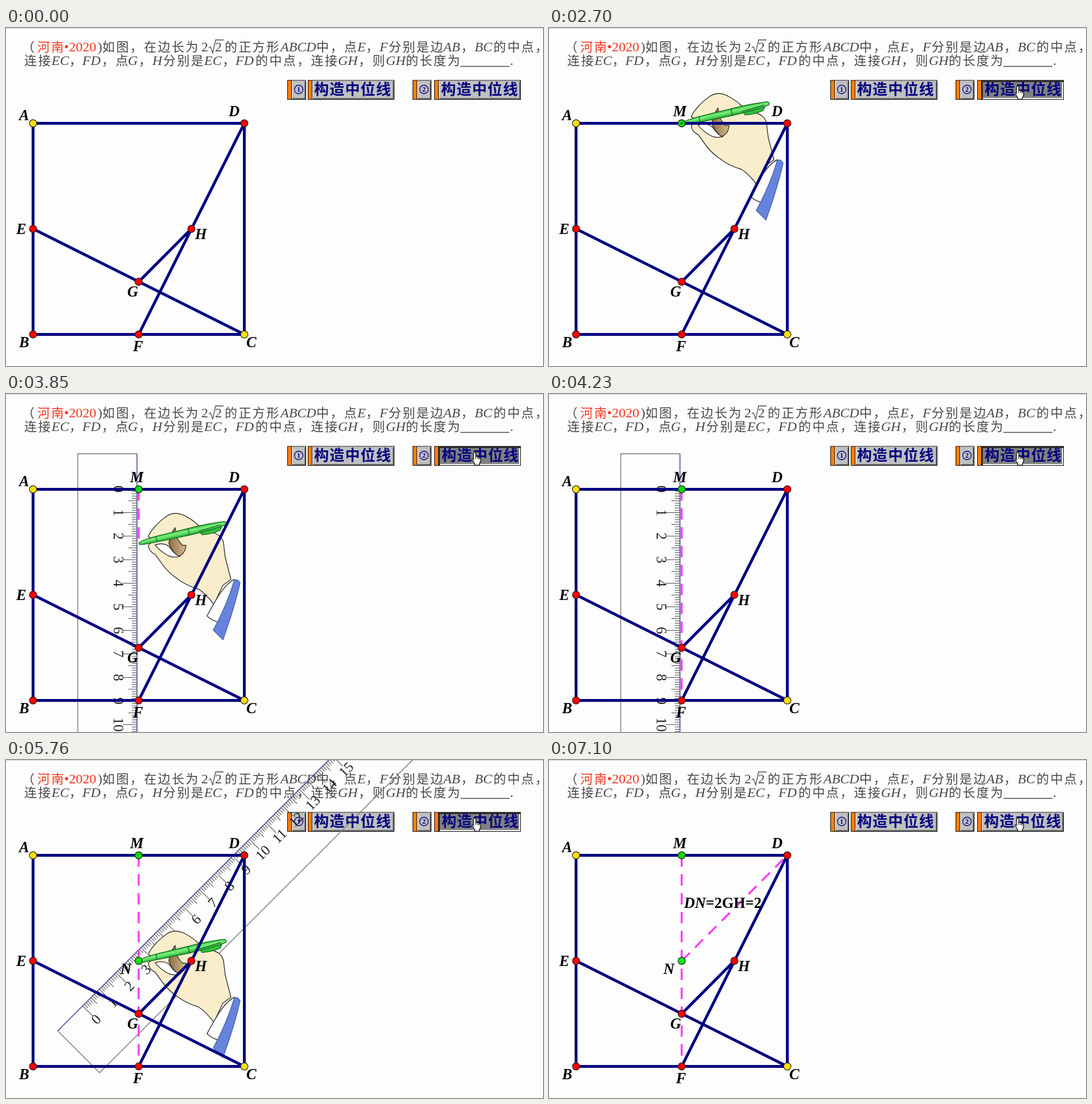
These frames come from a looping animation (943x594 px, 8 s). An HTML page:

```html
<!DOCTYPE html>
<html lang="zh">
<head>
<meta charset="utf-8">
<title>构造中位线</title>
<style>
html, body { margin: 0; width: 100%; height: 100%; overflow: hidden; background: #fdfdfd; }
svg { display: block; width: 100vw; height: 100vh; }
text { white-space: pre; }
.cjk { font: 22px "Noto Sans CJK SC", "Noto Sans CJK", sans-serif; letter-spacing: 2.4px; fill: #484848; }
.num, .var { font: 24px "Liberation Serif", serif; fill: #484848; }
.var { font-style: italic; }
.red { fill: #f5341f; }
.label { font: italic bold 26.5px "Liberation Serif", serif; }
.label .up { font-style: normal; }
.btn { font: bold 26px "Noto Sans CJK SC", "Noto Sans CJK", sans-serif; letter-spacing: 1.2px; fill: #000080; }
.digit { font: bold 12px "Liberation Serif", serif; fill: #000080; text-anchor: middle; }
.scale { font: 25px "Liberation Serif", serif; text-anchor: middle; fill: #222; }
.line { fill: none; stroke: #000080; stroke-width: 5; }
.dash { stroke: #fb3cf4; stroke-width: 3.4; stroke-dasharray: 20 13.2; }
</style>
</head>
<body>
<svg viewBox="0 0 943 594" preserveAspectRatio="none">
  <defs>
    <linearGradient id="pen" x1="0" y1="0" x2="0" y2="1">
      <stop offset="0" stop-color="#2fc23a"/><stop offset=".4" stop-color="#7df07c"/><stop offset="1" stop-color="#18a52a"/>
    </linearGradient>
    <linearGradient id="palm">
      <stop offset="0" stop-color="#8c6b45"/><stop offset="1" stop-color="#d9bd8e"/>
    </linearGradient>
  </defs>
  <path d="M0 .5H943" stroke="#cfcfcf"/>
  <g id="title"></g>
  <g id="buttons"></g>
  <g id="ruler" fill="none"></g>
  <g id="hand" stroke="#333" stroke-width="1.4" stroke-linejoin="round">
    <path fill="#f9edcb" d="M17-11C18-19 36-38 45-44C56-54 69-54 81-48Q96-40 105-31L140-14Q147-9 149 0L152 25L162 64L148 74L132 108Q118 89 105 81Q82 74 67 62Q53 53 42 38L29 20Q18 15 17 4L27-6Z"/>
    <path fill="#fff" d="M29 3Q46-2 55 8Q62 20 73 23Q58 28 45 18Q33 10 29 3Z"/>
    <path fill="url(#palm)" d="M64-27Q54-14 53 1Q58 15 70 23Q82 19 83 4L77 4Q70-3 66-12Z"/>
    <path fill="#fff" d="M168 64C150 72 133 104 120 128Q127 135 139 139L168 80Z"/>
    <path fill="#6684dc" stroke="#4a62b0" d="M168 65Q174 63 178 70Q170 108 148 170L131 153Q155 109 168 65Z"/>
    <g transform="rotate(-12.6)">
      <path fill="#2fc23a" stroke="#176b20" d="M109 4L112 10Q130 13 145 9L149 3Z"/>
      <path fill="url(#pen)" stroke="#176b20" d="M0 1Q2-2 10-3L32-5L90-6Q130-7 155-4Q160-1 156 2Q130 6 90 6L32 5L6 4Q0 3 0 1Z"/>
      <path fill="none" stroke="#176b20" d="M32-5V5M90-6V6M108 3L148 0"/>
    </g>
  </g>
  <path id="lineMF" class="dash"/>
  <path id="lineND" class="dash"/>
  <path class="line" d="M47.5 167.5H418.5V538.5H47.5ZL47.5 353L418.5 538.5M418.5 167.5L233 538.5M325.5 353L233 446"/>
  <g id="points"></g>
  <text id="result" class="label">DN<tspan class="up">=2GH=2</tspan></text>
  <circle id="glow" cx="821.5" cy="101" r="13" fill="#e0d400" fill-opacity=".8"/>
  <g id="cursor" fill="#fff" stroke="#000" stroke-width="1.2" stroke-linejoin="round">
    <path id="arrow" d="M0 0V17L4 13L7 20L10 19L7 12H12Z"/>
    <path id="finger" d="M-2 14V1.500Q0-1 2 1.500V8Q4 6.500 5.500 8.500Q7 7.500 8 9.500Q10 9 10.500 11V16L8.500 20V23H0V20L-5 13Q-5 10 -2 13ZM2 8V12M5.500 9V12M8 10V13"/>
  </g>
</svg>
<script>
const $ = id => document.getElementById(id);
const LOOP = 8000;

// Problem text: x, text, class
const rows = [
  [41, [[28, "（", "cjk"], [55, "河南", "cjk red"], [102, "•2020", "num red"], [161, ")", "num"],
    [169, "如图，在边长为", "cjk"], [343, "2", "num"], [367, "2", "num"], [384, "的正方形", "cjk"],
    [482, "ABCD", "var"], [545, "中，点", "cjk"], [617, "E", "var"], [632, "，", "cjk"], [656, "F", "var"],
    [672, "分别是边", "cjk"], [768, "AB", "var"], [799, "，", "cjk"], [823, "BC", "var"], [856, "的中点，", "cjk"]]],
  [65, [[32, "连接", "cjk"], [80, "EC", "var"], [111, "，", "cjk"], [134, "FD", "var"], [168, "，点", "cjk"],
    [214, "G", "var"], [233, "，", "cjk"], [257, "H", "var"], [276, "分别是", "cjk"], [348, "EC", "var"],
    [380, "，", "cjk"], [403, "FD", "var"], [438, "的中点，连接", "cjk"], [583, "GH", "var"],
    [619, "，则", "cjk"], [667, "GH", "var"], [702, "的长度为", "cjk"], [885, ".", "num"]]]
];
const text = (x, y, s, cls) => `<text x="${x}" y="${y}" class="${cls}">${s}</text>`;
const rect = (x, y, w, h, fill) => `<rect x="${x}" y="${y}" width="${w}" height="${h}" fill="${fill}"/>`;

$("title").innerHTML = rows.map(([y, parts]) => parts.map(([x, s, c]) => text(x, y, s, c)).join("")).join("") +
  '<path d="M356 35l3-2l4 11l5-23H382M798 67.500H884" fill="none" stroke="#484848" stroke-width="1.3"/>';

function box(x, w, down) {
  const body = down ? "#808080" : "#c0c0c0";
  return rect(x, 91.5, w, 34.5, "#000") + rect(x + 1, 92.5, 6, 32.5, "#ff8000") +
    rect(x + 8, 92.5, w - 9, 32.5, down ? "#303030" : "#fff") +
    (down ? rect(x + 10, 95, w - 11, 30, "#fff") + rect(x + 10, 95, w - 13, 28, body)
          : rect(x + 9, 93.5, w - 10, 31.5, "#707070") + rect(x + 9, 93.5, w - 12, 29.5, body));
}
const caption = x => text(x, 117, "构造中位线", "btn");
const small = (x, n) => box(x, 33) +
  `<circle cx="${x + 20}" cy="108" r="7.500" fill="none" stroke="#000080" stroke-width="1.3"/>` + text(x + 20, 112, n, "digit");
$("buttons").innerHTML = small(494, 1) + box(530, 152) + caption(541) + small(714, 2) +
  `<g id="up">${box(752, 152)}${caption(764)}</g><g id="down">${box(752, 152, true)}${caption(765)}</g>`;

// Ruler: x runs along the measuring edge, 0 at the origin
const UNIT = 41.4;
let ticks = "", scale = "";
for (let i = 0; i <= 200; i++) {
  ticks += `M${(i * UNIT / 10).toFixed(2)} 0v${i % 10 ? (i % 5 ? 9 : 15) : 25}`;
  if (i % 10 === 0) scale += text(i / 10 * UNIT, 41.5, i / 10, "scale");
}
$("ruler").innerHTML = `<path d="M-62 0V104H870V0" stroke="#777" stroke-width="1.4"/>` +
  `<path d="M-62 0H870" stroke="#34349a" stroke-width="1.4"/><path d="${ticks}" stroke="#444"/>${scale}`;

// Points: name, x, y, colour, label x, label baseline
const points = [
  ["A", 47.5, 167.5, "#ffe000", 23, 162], ["D", 418.5, 167.5, "#f00", 391, 155],
  ["E", 47.5, 353, "#f00", 18, 362], ["B", 47.5, 538.5, "#f00", 23, 561],
  ["F", 233, 538.5, "#f00", 223, 568], ["C", 418.5, 538.5, "#ffe000", 422, 561],
  ["G", 233, 446, "#f00", 213, 472], ["H", 325.5, 353, "#f00", 332, 371],
  ["M", 233, 167.5, "#10d810", 218, 155], ["N", 233, 353, "#10e810", 201, 376]
];
$("points").innerHTML = points.map(([n, x, y, c, lx, ly]) =>
  `<g id="pt${n}"><circle cx="${x}" cy="${y}" r="6.400" fill="${c}" stroke="#222" stroke-width="1.200"/>${text(lx, ly, n, "label")}</g>`
).join("") + '<circle id="spot" cx="233" cy="167.500" r="1.600"/>';

// Motion tables: time, then values
const cursorPath = [[340, 866, 592], [600, 850, 330], [850, 831, 120], [950, 826, 62], [1110, 820, 99], [1310, 820, 99], [1440, 823, 102]];
const dropM = [[2260, 242, 66], [2680, 233, 167.5]];
const drawMF = [[3755, 167.5], [3850, 261], [3900, 309], [4230, 538.5]];
const dropN = [[4630, 239, 252], [4970, 235, 319], [5130, 233, 353]];
const drawND = [[6150, 0], [6180, .032], [6360, .48], [6550, .87], [6590, 1]];
const slide1 = [[3110, -126, -84], [3700, 0, 0]];
const slide2 = [[5560, -155, 122], [6120, 0, 0]];

function at(t, keys) {
  if (t <= keys[0][0]) return keys[0].slice(1);
  for (let i = 1; i < keys.length; i++) {
    const a = keys[i - 1], b = keys[i];
    if (t < b[0]) return b.slice(1).map((v, j) => a[j + 1] + (v - a[j + 1]) * (t - a[0]) / (b[0] - a[0]));
  }
  return keys[keys.length - 1].slice(1);
}
const show = (id, on) => $(id).style.display = on ? "" : "none";
const place = (id, x, y, turn = 0) => $(id).setAttribute("transform", `translate(${x} ${y}) rotate(${turn})`);

function render(t) {
  const [cx, cy] = at(t, cursorPath);
  const over = cy > 91 && cy < 126 && t > 950;
  show("cursor", t >= 340);
  show("arrow", !over);
  show("finger", over);
  place("cursor", cx, cy);
  show("glow", t >= 1980 && t < 2080);
  const pressed = t >= 1980 && t < 7080;
  show("down", pressed);
  show("up", !pressed);

  const [endY] = at(t, drawMF), [p] = at(t, drawND);
  const nx = 233 + 185.5 * p, ny = 353 - 185.5 * p;
  show("lineMF", t > 3755);
  $("lineMF").setAttribute("d", `M233 167.5V${endY}`);
  show("lineND", p > 0);
  $("lineND").setAttribute("d", `M233 353L${nx} ${ny}`);
  show("result", p > 0);
  place("result", 154.5 + 82.5 * p, 340.5 - 81 * p);

  show("ptM", t >= 2650);
  show("spot", t >= 2650 && t < 3110);
  show("ptN", t >= 5120);

  show("hand", t >= 2260 && t < 4230 || t >= 4630 && t < 6590);
  const [hx, hy] = t < 3755 ? at(t, dropM) : t < 4630 ? [233, endY] : t < 6150 ? at(t, dropN) : [nx, ny];
  place("hand", hx, hy);

  const first = t < 5000;
  show("ruler", t >= 3110 && t < 4490 || t >= 5560 && t < 6820);
  const [dx, dy] = at(t, first ? slide1 : slide2);
  if (first) place("ruler", 230 + dx, 167 + dy, 90);
  else place("ruler", 234 + dx, 354 + dy, -45);
}

const start = performance.now();
function tick() {
  render((performance.now() - start) % LOOP);
  requestAnimationFrame(tick);
}
tick();
</script>
</body>
</html>
```
